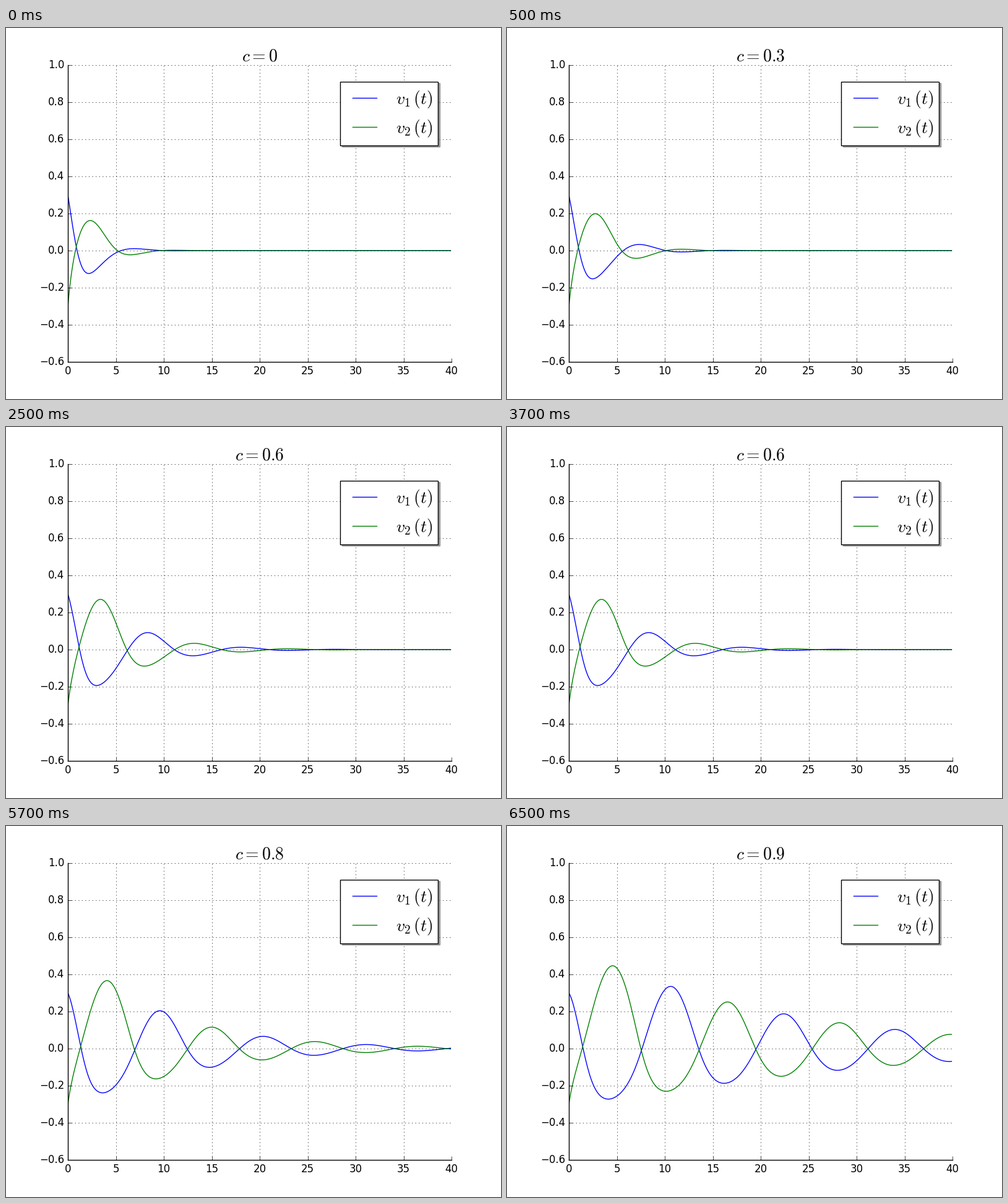
These frames come from a looping animation (800x600 px, 8000 ms). A matplotlib script:

```python
import numpy as np
import matplotlib.pyplot as plt
from matplotlib.animation import FuncAnimation
from matplotlib.patches import Rectangle

plt.style.use("classic")
plt.rcParams["font.sans-serif"] = ["DejaVu Sans"]

COUPLINGS = [0, 0.3, 0.6, 0.8, 0.9]
INTERVAL = 500
FRAMES = 16
STEP = 0.1
TIMES = np.arange(0, 40, STEP)
COLORS = ["b", "g"]


def derivative(state, c):
    """Two FitzHugh-Nagumo cells that inhibit each other with strength c."""
    v, w = state
    dv = v * (v - 0.5) * (1 - v) - w - c * np.tanh(v[::-1])
    dw = 0.5 * (v - w)
    return np.array([dv, dw])


def solve(c):
    state = np.array([[0.3, -0.3], [0.3, -0.3]])
    voltages = []
    for _ in TIMES:
        voltages.append(state[0])
        k1 = derivative(state, c)
        k2 = derivative(state + STEP / 2 * k1, c)
        k3 = derivative(state + STEP / 2 * k2, c)
        k4 = derivative(state + STEP * k3, c)
        state = state + STEP / 6 * (k1 + 2 * k2 + 2 * k3 + k4)
    return np.array(voltages).T


def draw_legend(fig):
    """Legend drawn on an overlay measured in pixels from the top left."""
    layer = fig.add_axes([0, 0, 1, 1])
    layer.set(xlim=(0, 800), ylim=(600, 0))
    layer.axis("off")
    x, y, width, height = 540.2, 86.6, 158, 103
    shift = 2.78
    layer.add_patch(Rectangle((x + shift, y + shift), width, height,
                              fc="0.3", ec="0.3", alpha=0.5, lw=1))
    layer.add_patch(Rectangle((x, y), width, height, fc="w", ec="k", lw=1))
    for i, color in enumerate(COLORS):
        row = 113.4 + 46.7 * i
        layer.plot([560.2, 599.1], [row, row], color=color, lw=1)
        layer.text(629.6, row + 9.7, rf"$v_{i + 1}\,(t)$", fontsize=20,
                   va="baseline")


fig = plt.figure(figsize=(8, 6), dpi=100, facecolor="w")
ax = fig.add_axes([0.125, 0.1, 0.775, 0.8])
ax.set(xlim=(0, 40), ylim=(-0.6, 1.0))
ax.set_xticks(np.arange(0, 41, 5))
ax.set_yticks(np.linspace(-0.6, 1.0, 9).round(1))
ax.grid(True)
ax.tick_params(top=False, right=False)
for side in ("top", "right"):
    ax.spines[side].set_visible(False)

curves = [ax.plot([], [], color=color, lw=1)[0] for color in COLORS]
title = ax.set_title("", fontsize=20)
draw_legend(fig)
solutions = [solve(c) for c in COUPLINGS]


def update(frame):
    index = (frame + 3) // 4
    for curve, voltage in zip(curves, solutions[index]):
        curve.set_data(TIMES, voltage)
    title.set_text(f"$c={COUPLINGS[index]}$")
    return [*curves, title]


anim = FuncAnimation(fig, update, frames=FRAMES, interval=INTERVAL,
                     repeat=True, repeat_delay=0, blit=False)
plt.show()
```
